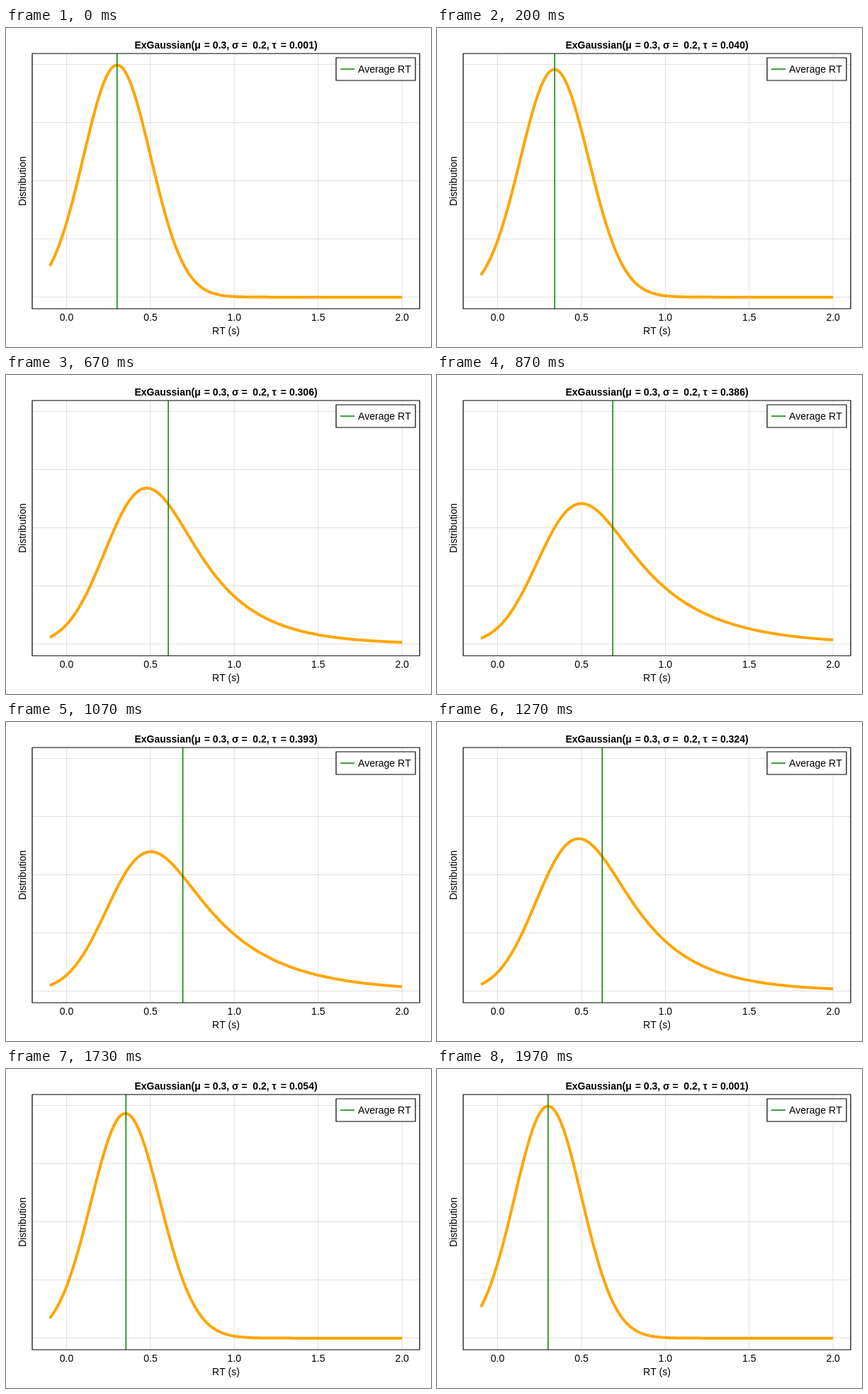
An HTML page with a canvas for the animation above (2.01 s loop, 600 by 450 pixels).

```html
<!DOCTYPE html>
<html lang="en">
<head>
<meta charset="utf-8">
<title>ExGaussian distribution</title>
<style>
  html, body { margin: 0; width: 100%; height: 100%; overflow: hidden; background: #fff; }
  canvas { display: block; width: 600px; height: 450px; }
</style>
</head>
<body>
<canvas id="plot" width="600" height="450"></canvas>
<script>
const ctx = document.getElementById('plot').getContext('2d');

const LOOP = 2010, STEPS = 60;
const MU = 0.3, SIGMA = 0.2, TAU_MIN = 0.001, TAU_MAX = 0.4;
const X_FROM = -0.1, X_TO = 2, SAMPLES = 400;
const box = { left: 37, top: 36, right: 584, bottom: 396 };
const FONT = '14px "Liberation Sans", Arial, sans-serif';
const GREEN = '#008000';

// Axis limits: the data range plus 5% on each side
const PEAK = 1 / (SIGMA * Math.sqrt(2 * Math.PI));
const xScale = (box.right - box.left) / ((X_TO - X_FROM) * 1.1);
const yScale = (box.bottom - box.top) / (PEAK * 1.1);
const px = x => box.left + (x - X_FROM + (X_TO - X_FROM) * 0.05) * xScale;
const py = y => box.bottom - (y + PEAK * 0.05) * yScale;

// Chebyshev fit of exp(z^2) * erfc(z)
const CHEB = [-1.26551223, 1.00002368, 0.37409196, 0.09678418, -0.18628806,
  0.27886807, -1.13520398, 1.48851587, -0.82215223, 0.17087277];

function erfcx(z) {
  if (z < 0) return 2 * Math.exp(z * z) - erfcx(-z);
  const t = 1 / (1 + z / 2);
  return t * Math.exp(CHEB.reduceRight((sum, c) => sum * t + c, 0));
}

function density(x, tau) {
  const d = (x - MU) / SIGMA;
  return Math.exp(-d * d / 2) * erfcx((SIGMA / tau - d) / Math.SQRT2) / (2 * tau);
}

function line(x1, y1, x2, y2, color, width) {
  ctx.strokeStyle = color;
  ctx.lineWidth = width;
  ctx.beginPath();
  ctx.moveTo(x1, y1);
  ctx.lineTo(x2, y2);
  ctx.stroke();
}

function frame(x, y, w, h) {
  ctx.strokeStyle = '#000';
  ctx.lineWidth = 1.2;
  ctx.strokeRect(x, y, w, h);
}

function text(str, x, y, align = 'center') {
  ctx.fillStyle = '#000';
  ctx.textAlign = align;
  ctx.fillText(str, x, y);
}

function drawGrid() {
  const color = 'rgba(0,0,0,0.12)';
  for (let i = 0; i <= 4; i++) {
    const x = px(i / 2), y = py(i / 2);
    line(x, box.top, x, box.bottom, color, 1);
    line(box.left, y, box.right, y, color, 1);
  }
}

function drawCurve(tau) {
  ctx.strokeStyle = '#ffa500';
  ctx.lineWidth = 4;
  ctx.lineJoin = 'round';
  ctx.beginPath();
  for (let i = 0; i <= SAMPLES; i++) {
    const x = X_FROM + (X_TO - X_FROM) * i / SAMPLES;
    ctx.lineTo(px(x), py(density(x, tau)));
  }
  ctx.stroke();
}

function drawLabels(tau) {
  const mid = (box.left + box.right) / 2;
  ctx.font = 'bold ' + FONT;
  text('ExGaussian(μ', 181.4, 29, 'left');
  text('= 0.3, σ', 279.8, 29, 'left');
  text('=  0.2, τ', 332.4, 29, 'left');
  text(`= ${tau.toFixed(3)})`, 439.6, 29, 'right');

  ctx.font = FONT;
  for (let i = 0; i <= 4; i++) text((i / 2).toFixed(1), px(i / 2), 412.5);
  text('RT (s)', mid, 431.5);
  ctx.save();
  ctx.translate(27.7, (box.top + box.bottom) / 2);
  ctx.rotate(-Math.PI / 2);
  text('Distribution', 0, 0);
  ctx.restore();
}

function drawLegend() {
  ctx.fillStyle = '#fff';
  ctx.fillRect(466, 42, 112, 32);
  frame(466, 42, 112, 32);
  line(472, 58, 492, 58, GREEN, 1.5);
  text('Average RT', 497, 63.2, 'left');
}

function draw(now) {
  const t = Math.floor((now % LOOP) / 10) * 10;
  const step = Math.min(STEPS - 1, Math.floor((t + 5) * 0.03));
  const swing = (1 - Math.cos(2 * Math.PI * step / (STEPS - 1))) / 2;
  const tau = TAU_MIN + (TAU_MAX - TAU_MIN) * swing;
  const mean = px(MU + tau);

  ctx.fillStyle = '#fff';
  ctx.fillRect(0, 0, 600, 450);
  ctx.fontKerning = 'none';
  drawGrid();
  drawCurve(tau);
  line(mean, box.top, mean, box.bottom, GREEN, 1.5);
  frame(box.left, box.top, box.right - box.left, box.bottom - box.top);
  drawLabels(tau);
  drawLegend();
}

let start = null;
function tick(now) {
  if (start === null) start = now;
  draw(now - start);
  requestAnimationFrame(tick);
}
draw(0);
requestAnimationFrame(tick);
</script>
</body>
</html>
```
